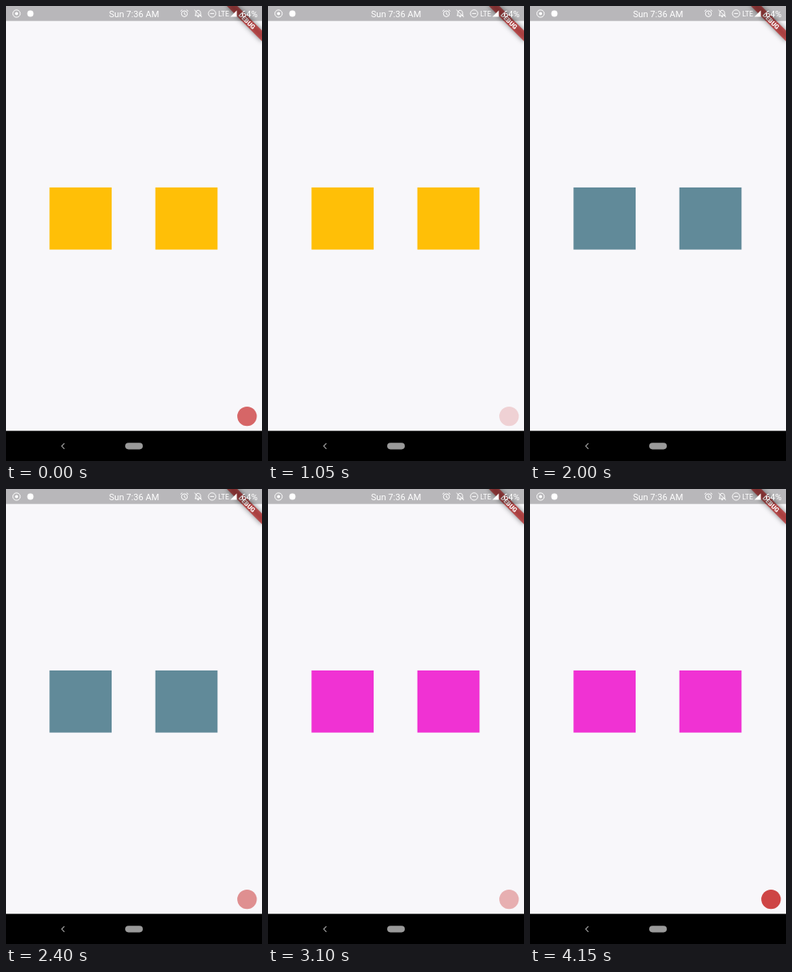
An HTML page with a canvas that plays this animation: 320x569 px, repeating every 4.2 s.

```html
<!DOCTYPE html>
<html lang="en">
<head>
<meta charset="utf-8">
<title>Color squares</title>
<style>
  html, body { margin: 0; width: 100%; height: 100%; overflow: hidden; background: #f8f7fa; }
  canvas { display: block; width: 100vw; height: 100vh; }
</style>
</head>
<body>
<canvas id="stage"></canvas>
<script>
const W = 320, H = 569, LOOP = 4200;
const canvas = document.getElementById('stage');
const ctx = canvas.getContext('2d');
const ratio = window.devicePixelRatio || 1;
canvas.width = W * ratio;
canvas.height = H * ratio;

// Square colours and the time each one appears
const COLORS = [
  [0, '#ffbf07'],
  [1450, '#21456b'],
  [1900, '#618a99'],
  [2450, '#67a9c0'],
  [2950, '#f032d3']
];

const BLINK = { start: -250, period: 1235, fade: 380, out: 625 };

const clamp = v => Math.max(0, Math.min(1, v));

function squareColor(t) {
  return COLORS.filter(c => c[0] <= t).pop()[1];
}

function dotAlpha(t) {
  const p = (t - BLINK.start) % BLINK.period;
  return clamp(p / BLINK.fade) - clamp((p - BLINK.out) / BLINK.fade);
}

function rect(x, y, w, h, color) {
  ctx.fillStyle = color;
  ctx.fillRect(x, y, w, h);
}

function disc(x, y, r, color) {
  ctx.fillStyle = color;
  ctx.beginPath();
  ctx.arc(x, y, r, 0, Math.PI * 2);
  ctx.fill();
}

function ring(x, y, r) {
  ctx.beginPath();
  ctx.arc(x, y, r, 0, Math.PI * 2);
  ctx.stroke();
}

function line(...pts) {
  ctx.beginPath();
  for (let i = 0; i < pts.length; i += 2) ctx.lineTo(pts[i], pts[i + 1]);
  ctx.stroke();
}

function text(str, x, y, size, align = 'left', weight = 400) {
  ctx.font = `${weight} ${size}px Roboto, sans-serif`;
  ctx.textAlign = align;
  ctx.fillText(str, x, y);
}

function drawBanner() {
  ctx.save();
  ctx.translate(W, 0);
  ctx.rotate(Math.PI / 4);
  ctx.filter = `blur(${3 * ratio}px)`;
  rect(-31, 21.8, 62, 9.3, 'rgba(0,0,0,.5)');
  ctx.filter = 'none';
  rect(-31, 21.8, 62, 9.3, 'rgba(183,28,28,.68)');
  ctx.fillStyle = '#fff';
  text('DEBUG', 0, 29.3, 7.9, 'center', 900);
  ctx.restore();
}

function drawAlarm(x, y) {
  ring(x, y + 0.4, 3.7);
  line(x, y - 1.6, x, y + 0.8, x + 1.7, y + 1.8);
  line(x - 4.9, y - 2.7, x - 2.7, y - 4.6);
  line(x + 4.9, y - 2.7, x + 2.7, y - 4.6);
}

function drawBellOff(x, y) {
  ctx.beginPath();
  ctx.moveTo(x - 4, y + 3);
  ctx.lineTo(x - 3, y + 2);
  ctx.lineTo(x - 3, y - 0.5);
  ctx.bezierCurveTo(x - 3, y - 4.6, x + 3, y - 4.6, x + 3, y - 0.5);
  ctx.lineTo(x + 3, y + 2);
  ctx.lineTo(x + 4, y + 3);
  ctx.closePath();
  ctx.stroke();
  line(x - 4.6, y - 4, x + 4.6, y + 4.8);
  disc(x, y + 4.3, 1, '#fff');
}

function drawStatusBar() {
  rect(0, 0, W, 18.7, 'rgba(0,0,0,.26)');
  ctx.strokeStyle = '#fff';
  ctx.lineWidth = 1;
  ring(13.2, 9.5, 4.6);
  disc(13.2, 9.5, 1.9, '#fff');
  disc(30.5, 9.5, 3.9, '#fff');
  drawAlarm(223, 9.3);
  drawBellOff(240.2, 9);
  ring(257.6, 9.4, 4.6);
  line(255.2, 9.4, 260, 9.4);
  ctx.fillStyle = '#fff';
  text('Sun 7:36 AM', 160, 13.6, 11.1, 'center');
  text('LTE', 265.3, 13, 8.6);
  text('64%', 314.6, 13.6, 11, 'right');
  ctx.beginPath();
  ctx.moveTo(280.5, 13.4);
  ctx.lineTo(288.5, 13.4);
  ctx.lineTo(288.5, 5.4);
  ctx.fill();
}

function drawNavBar() {
  rect(0, 531.3, W, H - 531.3, '#000');
  ctx.strokeStyle = '#a8a8a8';
  ctx.lineWidth = 1.1;
  line(73, 546.8, 69.6, 550.3, 73, 553.8);
  ctx.fillStyle = '#9a9a9a';
  ctx.beginPath();
  ctx.roundRect(149, 546.2, 22, 8.2, 4.1);
  ctx.fill();
}

function draw(t) {
  ctx.setTransform(ratio, 0, 0, ratio, 0, 0);
  rect(0, 0, W, H, '#f8f7fa');
  const color = squareColor(t);
  for (const x of [54.4, 186.7]) rect(x, 226.9, 77.7, 77.7, color);
  drawBanner();
  drawStatusBar();
  drawNavBar();
  ctx.globalAlpha = dotAlpha(t);
  disc(301.3, 513.1, 12.2, '#c41b1b');
  ctx.globalAlpha = 1;
}

const begin = performance.now();
function tick() {
  draw((performance.now() - begin) % LOOP);
  requestAnimationFrame(tick);
}
tick();
</script>
</body>
</html>
```
